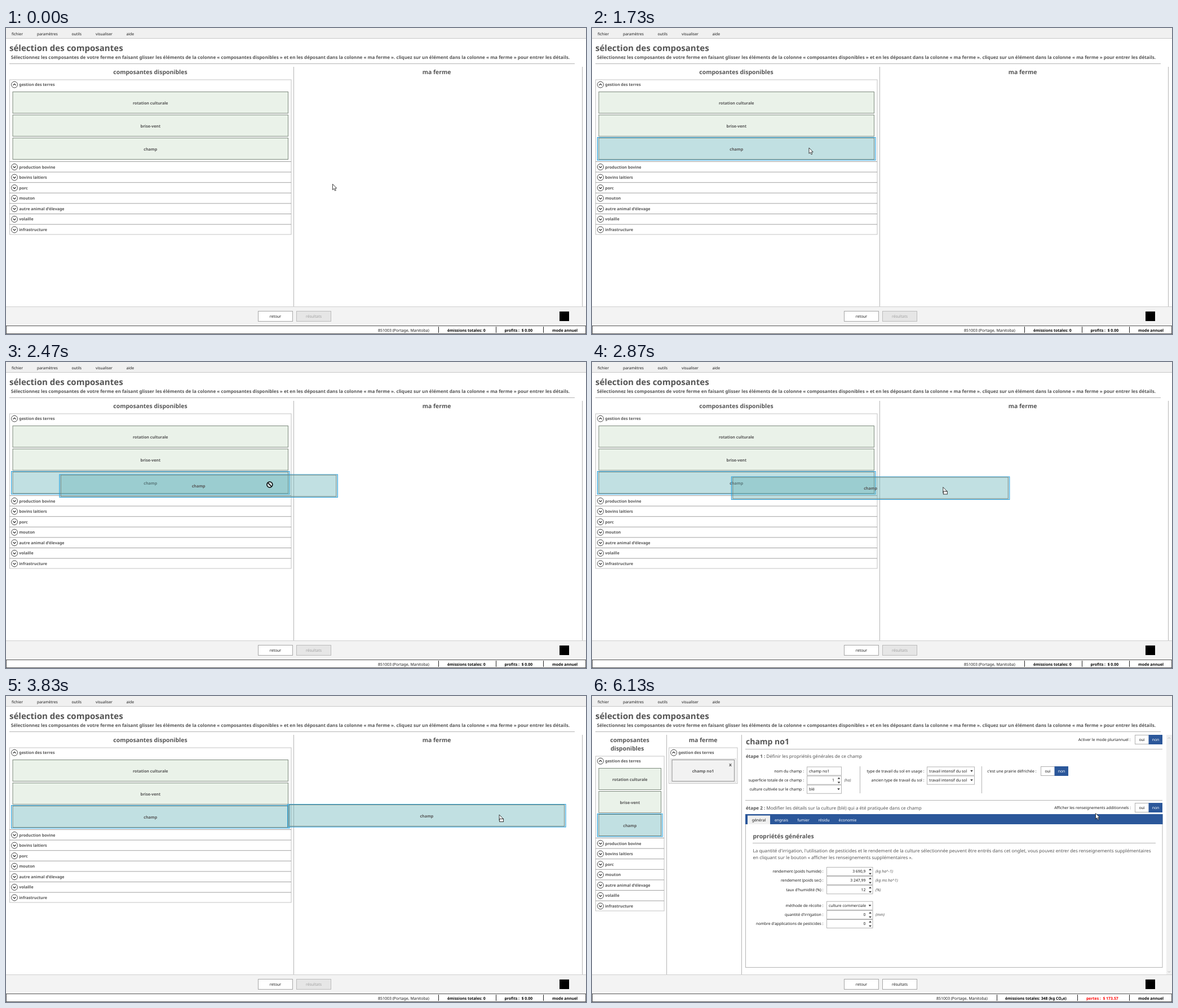
An HTML page that plays this animation: 1029 px wide and 544 px high, repeating every 6.86 s.

```html
<!DOCTYPE html>
<html lang="fr">
<head>
<meta charset="utf-8">
<title>Sélection des composantes</title>
<style>
html, body { margin: 0; width: 100%; height: 100%; overflow: hidden; background: #fff; }
svg { display: block; width: 100vw; height: 100vh; }
text { font-family: "Noto Sans", "Open Sans", sans-serif; text-rendering: geometricPrecision; white-space: pre; }
.b { font-weight: 700; }
.i { font-style: italic; }
.halo { fill: #26a0da; fill-opacity: 0; stroke: #26a0da; stroke-opacity: 0; }
.hover .halo { fill-opacity: .12; stroke-opacity: .66; }
.picked .halo, #ghost .halo { fill-opacity: .24; stroke-opacity: 1; }
</style>
</head>
<body>
<svg id="stage" viewBox="0 0 1029 544"></svg>
<script>
const LOOP = 6860, HOVER = 800, PRESS = 1500, DRAG = 1780, DROP = 5100, OPEN = 5230, FADE_END = 6130;
const GREY = '#555', INK = '#1c1c1c', LINE = '#b4b4b4', BLUE = '#2b579a';
const GRAB = { x: 384.5, y: 212.5 };

// Text is placed by the middle of its capital height.
const text = (s, x, cy, size = 6.9, { fill = INK, anchor = 'start', cls = '', id = '' } = {}) =>
  `<text id="${id}" x="${x}" y="${cy + size * .36}" font-size="${size}" fill="${fill}" text-anchor="${anchor}" class="${cls}">${s}</text>`;
const bold = (s, x, cy, size = 7.05, o = {}) => text(s, x, cy, size, { fill: GREY, cls: 'b', ...o });
const mid = { anchor: 'middle' }, end = { anchor: 'end' };
const rect = (x1, y1, x2, y2, fill = 'none', stroke = 'none', extra = '') =>
  `<rect x="${x1}" y="${y1}" width="${x2 - x1}" height="${y2 - y1}" fill="${fill}" stroke="${stroke}" ${extra}/>`;
const line = (x1, y1, x2, y2, stroke = LINE) =>
  `<path d="M${x1} ${y1}L${x2} ${y2}" stroke="${stroke}"/>`;

const chevron = (cy, up) => {
  const d = up ? -1 : 1;
  return `<g fill="none" stroke="#333"><circle cx="0" cy="${cy}" r="5.5" stroke-width=".9"/>
    <path d="M-2.5 ${cy - d}l2.5 ${2.4 * d}l2.5 ${-2.4 * d}" stroke-width="1.3"/></g>`;
};
const expander = (label, x, cy, up) =>
  `<g transform="translate(${x})">${chevron(cy, up)}${bold(label, 8.2, cy)}</g>`;

const card = (label, x1, y, x2) =>
  rect(x1, y, x2, y + 38, '#96be91', '#7d8a7d', 'fill-opacity=".2"') +
  bold(label, (x1 + x2) / 2, y + 19.5, 7.05, mid);
const pickCard = (x1, y, x2) =>
  `<rect class="halo" x="${x1 - 2.5}" y="${y - 1}" width="${x2 - x1 + 5}" height="40.5"/>` + card('champ', x1, y, x2);

// List of available components, between x = 6.5 and the given right edge.
function available(right, dy) {
  const cardRight = right - 5.5;
  const rows = ['production bovine', 'bovins laitiers', 'porc', 'mouton', "autre animal d'élevage", 'volaille', 'infrastructure'];
  return `<g transform="translate(0 ${dy})">` +
    rect(6.5, 92, right, 367, 'none', '#c4c4c4') +
    expander('gestion des terres', 15, 100.7, true) +
    card('rotation culturale', 12, 113.5, cardRight) +
    card('brise-vent', 12, 154.5, cardRight) +
    `<g class="pick">${pickCard(12, 195.5, cardRight)}</g>` +
    rows.map((label, i) => line(6, 237.5 + i * 18.6, right, 237.5 + i * 18.6, '#a0a0a0') +
      expander(label, 15, 247 + i * 18.58, false)).join('') + '</g>';
}

const button = (label, x, enabled) =>
  rect(x + .5, 503.5, x + 61.5, 521.5, enabled ? '#fff' : '#e6e6e6', enabled ? '#a6a6a6' : '#bcbcbc') +
  text(label, x + 31, 513, 6.9, { ...mid, fill: enabled ? INK : '#a0a0a0' });

const toggle = (label, x, y, labelEnd) =>
  text(label, labelEnd, y + 8.5, 6.9, end) +
  rect(x + .5, y + .5, x + 48.5, y + 16.5, '#fff', '#b0b0b0') + rect(x + 24.5, y, x + 49, y + 17, BLUE) +
  text('oui', x + 12.5, y + 8.7, 6.9, mid) + text('non', x + 37, y + 8.7, 6.9, { ...mid, fill: '#fff' });

const arrow = (x, y, up) =>
  `<path d="M${x - 2.3} ${y}h4.6l-2.3 ${up ? -3 : 3}z" fill="#333"/>`;
function field(label, labelEnd, x1, x2, cy, value, kind, unit = '') {
  let s = text(label, labelEnd, cy, 6.9, end) + rect(x1 + .5, cy - 7.5, x2 - .5, cy + 7.5, '#fff', '#b4b4b4');
  if (kind === 'number')
    s += text(value, x2 - 13, cy, 6.9, end) + arrow(x2 - 5, cy - 2.2, true) + arrow(x2 - 5, cy + 2.8);
  else s += text(value, x1 + 4, cy, 6.9);
  if (kind === 'combo') s += arrow(x2 - 5.5, cy - 1.5);
  return s + text(unit, x2 + 4.5, cy, 6.9, { cls: 'i', fill: GREY });
}

const status = (items, seps) =>
  seps.map(x => line(x + .5, 531, x + .5, 542, '#222')).join('') + items.join('');
const stat = (s, x, fill = '#000', id = '') => bold(s, x, 537.3, 6.9, { fill, id });

const frame =
  rect(0, 0, 1029, 18, '#f0f0f0') + line(0, 18.5, 1029, 18.5, '#c8c8c8') +
  [['fichier', 10], ['paramètres', 55], ['outils', 116.5], ['visualiser', 159], ['aide', 213.5]]
    .map(([s, x]) => text(s, x, 10.2, 6.8)).join('') +
  bold('sélection des composantes', 6, 35.5, 15.05) +
  bold('Sélectionnez les composantes de votre ferme en faisant glisser les éléments de la colonne « composantes disponibles » et en les déposant dans la colonne « ma ferme ». cliquez sur un élément dans la colonne « ma ferme » pour entrer les détails.', 8.7, 51.7, 8.15) +
  line(6, 63.5, 1009, 63.5) +
  rect(0, 495, 1029, 529, '#f3f3f3') + line(0, 495.5, 1029, 495.5, '#cfcfcf') +
  button('retour', 447, true) +
  rect(982, 504, 999, 521, '#000') +
  rect(.5, 529.5, 1028.5, 543.5, '#fff', '#555') +
  stat('mode annuel', 969);

const before =
  bold('composantes disponibles', 256, 78, 10.45, mid) + bold('ma ferme', 764, 78, 10.45, mid) +
  line(510.5, 69, 510.5, 495) + line(1022.5, 69, 1022.5, 495) +
  available(506, 0) + button('résultats', 515, false) +
  status([text('851003 (Portage, Manitoba)', 660, 537.3, 6.98), stat('émissions totales: 0', 783),
    stat('profits :\u00a0 $ 0.00', 884.5)], [767, 869, 953]);

const para = { fill: GREY };
const step = (n, s, cy) => text(`<tspan font-weight="700">étape ${n} :</tspan> ${s}`, 273, cy, 8.1, para);

const after =
  bold('composantes', 67, 78, 10.45, mid) + bold('disponibles', 62.5, 93, 10.45, mid) +
  bold('ma ferme', 197, 78, 10.45, mid) +
  line(132.5, 69, 132.5, 495) + line(265.5, 69, 265.5, 495) +
  available(128, 15) +
  rect(136.5, 92, 258, 155.5, 'none', '#c4c4c4') + expander('gestion des terres', 145, 100.7, true) +
  rect(139.5, 111.5, 255.5, 153.5, '#f6f6f6', '#dadada') + rect(142, 113.5, 252.5, 151.5, '#f2f2f2', '#8c8c8c') +
  bold('champ no1', 197, 133, 7.05, mid) + bold('x', 245.5, 122, 8.5, mid) +
  rect(1019, 69, 1029, 495, '#f0f0f0') +
  `<path d="M1021.5 76l2.3-2.3l2.3 2.3M1021.5 489l2.3 2.3l2.3-2.3" fill="none" stroke="#c0c0c0"/>` +
  bold('champ no1', 273, 80.5, 14) +
  toggle('Activer le mode pluriannuel :', 963, 69, 955.5) + line(272, 94.5, 1012, 94.5) +
  step(1, 'Définir les propriétés générales de ce champ', 107.5) +
  field('nom du champ :', 376, 381, 443, 133.5, 'champ no1', 'text') +
  field('superficie totale de ce champ :', 376, 381, 443, 149.7, '1', 'number', '(ha)') +
  field('culture cultivée sur le champ :', 376, 381, 443, 165.8, 'blé', 'combo') +
  line(475.5, 125, 475.5, 173) + line(691.5, 125, 691.5, 173) +
  field('type de travail du sol en usage :', 589.5, 594, 679, 133.5, 'travail intensif du sol', 'combo') +
  field('ancien type de travail du sol :', 589.5, 594, 679, 149.7, 'travail intensif du sol', 'combo') +
  toggle("c'est une prairie défrichée :", 796, 125, 788.5) + line(272, 185.5, 1012, 185.5) +
  step(2, 'Modifier les détails sur la culture (blé) qui a été pratiquée dans ce champ', 199) +
  toggle('Afficher les renseignements additionnels :', 963, 190, 956) +
  rect(272.5, 210.5, 1012, 482.5, '#fff', '#b4b4b4') + rect(272, 210, 1012.5, 228, BLUE) +
  rect(276, 212.5, 316, 228, '#f0f0f0') + text('général', 296, 220.5, 6.9, mid) +
  [['engrais', 336], ['fumier', 375], ['résidu', 411.5], ['économie', 453.5]]
    .map(([s, x]) => text(s, x, 220.5, 6.9, { ...mid, fill: '#fff' })).join('') +
  bold('propriétés générales', 285.5, 249, 10.45) + line(285, 261.5, 1000, 261.5) +
  text("La quantité d'irrigation, l'utilisation de pesticides et le rendement de la culture sélectionnée peuvent être entrés dans cet onglet, vous pouvez entrer des renseignements supplémentaires", 285.5, 274.7, 8.1, para) +
  text('en cliquant sur le bouton « afficher les renseignements supplémentaires ».', 285.5, 286.7, 8.1, para) +
  [['rendement (poids humide) :', 312, '3 690,9', 'number', '(kg ha^-1)'],
   ['rendement (poids sec) :', 328, '3 247,99', 'number', '(kg ms ha^1)'],
   ["taux d'humidité (%) :", 344.3, '12', 'number', '(%)'],
   ['méthode de récolte :', 372.7, 'culture commerciale', 'combo'],
   ["quantité d'irrigation :", 389, '0', 'number', '(mm)'],
   ["nombre d'applications de pesticides :", 405, '0', 'number']]
    .map(([label, cy, ...rest]) => field(label, 410.5, 416, 498.5, cy, ...rest)).join('') +
  button('résultats', 515, true) +
  status([text('851003 (Portage, Manitoba)', 611, 537.3, 6.98),
    stat('émissions totales: 348 (kg CO₂e)', 733, '#000', 'total'),
    stat('pertes :\u00a0 $ 173.57', 877, '#f00')], [718, 861, 953]);

const pointer =
  `<path id="arrow" d="M.5 .5v10.2l2.4-2.2l1.6 3.8l1.8-.8l-1.6-3.6h3z" fill="#fff" stroke="#111" stroke-width=".8"/>
  <rect id="parcel" x="1" y="8" width="7" height="5" fill="#fff" stroke="#222" stroke-width=".9"/>
  <g id="forbidden" fill="none" stroke="#000" stroke-width="1.5"><circle cx="-2" cy="0" r="5" fill="#fff" fill-opacity=".55"/><path d="M-5.4-3.4l6.8 6.8"/></g>`;

document.getElementById('stage').innerHTML = frame +
  `<g id="before">${before}</g><g id="after">${after}</g>
  <g id="ghost">${pickCard(12, 195.5, 500.5)}</g><g id="pointer">${pointer}</g>`;

const el = id => document.getElementById(id);
const show = (id, on) => el(id).setAttribute('display', on ? 'inline' : 'none');
const move = (id, x, y) => el(id).setAttribute('transform', `translate(${x.toFixed(2)} ${y.toFixed(2)})`);

// Pointer path: time, x, y, and whether the leg up to that point is eased.
const path = [
  [370, 579, 277], [1030, 407, 219, true], [1070, 407, 219], [1240, 381.5, 213, true], [1330, GRAB.x, GRAB.y],
  [DRAG, GRAB.x, GRAB.y], [2170, 409, 214.5], [2470, 469.5, 218], [2870, 622, 222], [3300, 764, 218.5],
  [3585, 834, 215], [3830, 874.5, 210.5], [4090, 896, 208.5], [4200, 893, 208]
];
function position(t) {
  const i = path.findIndex(p => p[0] > t);
  if (i === 0) return path[0].slice(1, 3);
  if (i < 0) return path[path.length - 1].slice(1, 3);
  const [t0, x0, y0] = path[i - 1], [t1, x1, y1, eased] = path[i];
  let k = (t - t0) / (t1 - t0);
  if (eased) k = k * k * (3 - 2 * k);
  return [x0 + (x1 - x0) * k, y0 + (y1 - y0) * k];
}

function draw(t) {
  const [x, y] = position(t);
  const opened = t >= OPEN, dragging = t >= DRAG && t < DROP, overFarm = x > 510;
  show('before', !opened);
  show('after', opened);
  const state = t >= PRESS ? 'picked' : t >= HOVER ? 'hover' : '';
  document.querySelectorAll('.pick').forEach(g => g.setAttribute('class', `pick ${state}`));
  show('ghost', dragging);
  move('ghost', x - GRAB.x, y - GRAB.y);
  move('pointer', x, y);
  show('arrow', !dragging || overFarm);
  show('parcel', dragging && overFarm);
  show('forbidden', dragging && !overFarm);
  const fade = Math.min(1, Math.max(0, (t - OPEN) / (FADE_END - OPEN)));
  el('total').setAttribute('fill', `rgb(${Math.round(255 * (1 - fade))},0,0)`);
}

const start = performance.now();
function tick() {
  draw((performance.now() - start) % LOOP);
  requestAnimationFrame(tick);
}
tick();
</script>
</body>
</html>
```
